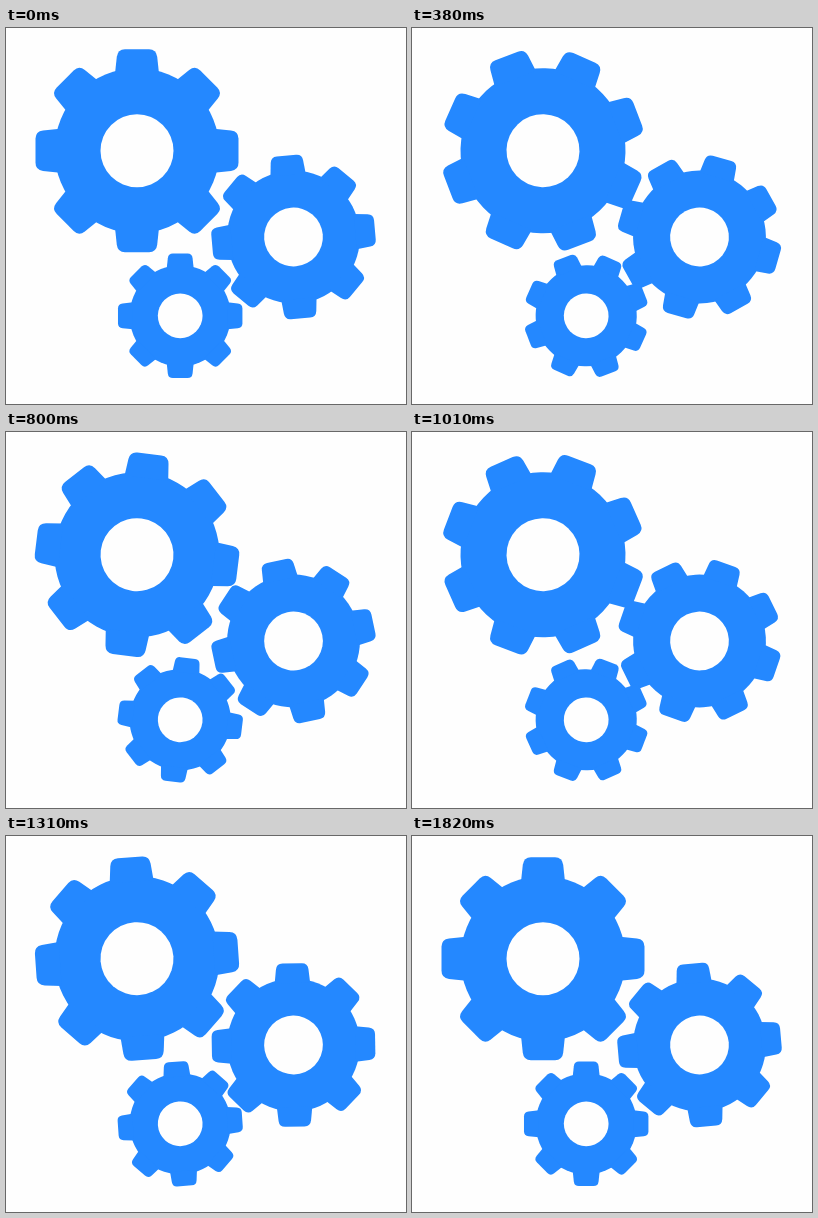
Write an HTML page that moves like this. It is 400 by 376 pixels and loops after 3320 ms.

```html
<!DOCTYPE html>
<html lang="en">
<head>
<meta charset="utf-8">
<title>Gears</title>
<style>
  html, body { margin: 0; width: 100%; height: 100%; overflow: hidden; background: #fefefe; }
  svg { display: block; width: 400px; height: 376px; }
</style>
</head>
<body>
<svg viewBox="0 0 400 376" fill="#2488ff">
  <defs>
    <path id="tooth" d="M-22-77 L-20.2-94 Q-19.3-101.5-12-101.5 H12 Q19.3-101.5 20.2-94 L22-77Z"/>
    <g id="gear">
      <circle r="82.5"/>
      <circle r="36.5" fill="#fefefe"/>
    </g>
  </defs>
</svg>
<script>
const LOOP = 3320, FIRST_HOLD = 50, STEP_MS = 30, STEPS = 60, STEP_DEG = 2;
const TEETH = 8;

const gears = [
  { x: 131, y: 122.7, scale: 1, start: 0, dir: 1 },
  { x: 287.5, y: 209, scale: 0.805, start: -5, dir: -1 },
  { x: 174.2, y: 287.8, scale: 0.613, start: 0, dir: 1 }
];

function addUse(parent, id) {
  const use = document.createElementNS('http://www.w3.org/2000/svg', 'use');
  use.setAttribute('href', '#' + id);
  return parent.appendChild(use);
}

const shape = document.getElementById('gear');
for (let i = 0; i < TEETH; i++) {
  addUse(shape, 'tooth').setAttribute('transform', `rotate(${i * 360 / TEETH})`);
}

const svg = document.querySelector('svg');
for (const gear of gears) gear.node = addUse(svg, 'gear');

function draw(now) {
  const t = now % LOOP;
  const step = Math.max(0, Math.floor((t - FIRST_HOLD) / STEP_MS) + 1);
  // The gears snap back to rest for the final hold.
  const turn = step < STEPS ? step * STEP_DEG : 0;
  for (const { node, x, y, scale, start, dir } of gears) {
    node.setAttribute('transform',
      `translate(${x} ${y}) rotate(${start + dir * turn}) scale(${scale})`);
  }
}

function tick() {
  draw(performance.now());
  requestAnimationFrame(tick);
}
tick();
</script>
</body>
</html>
```
